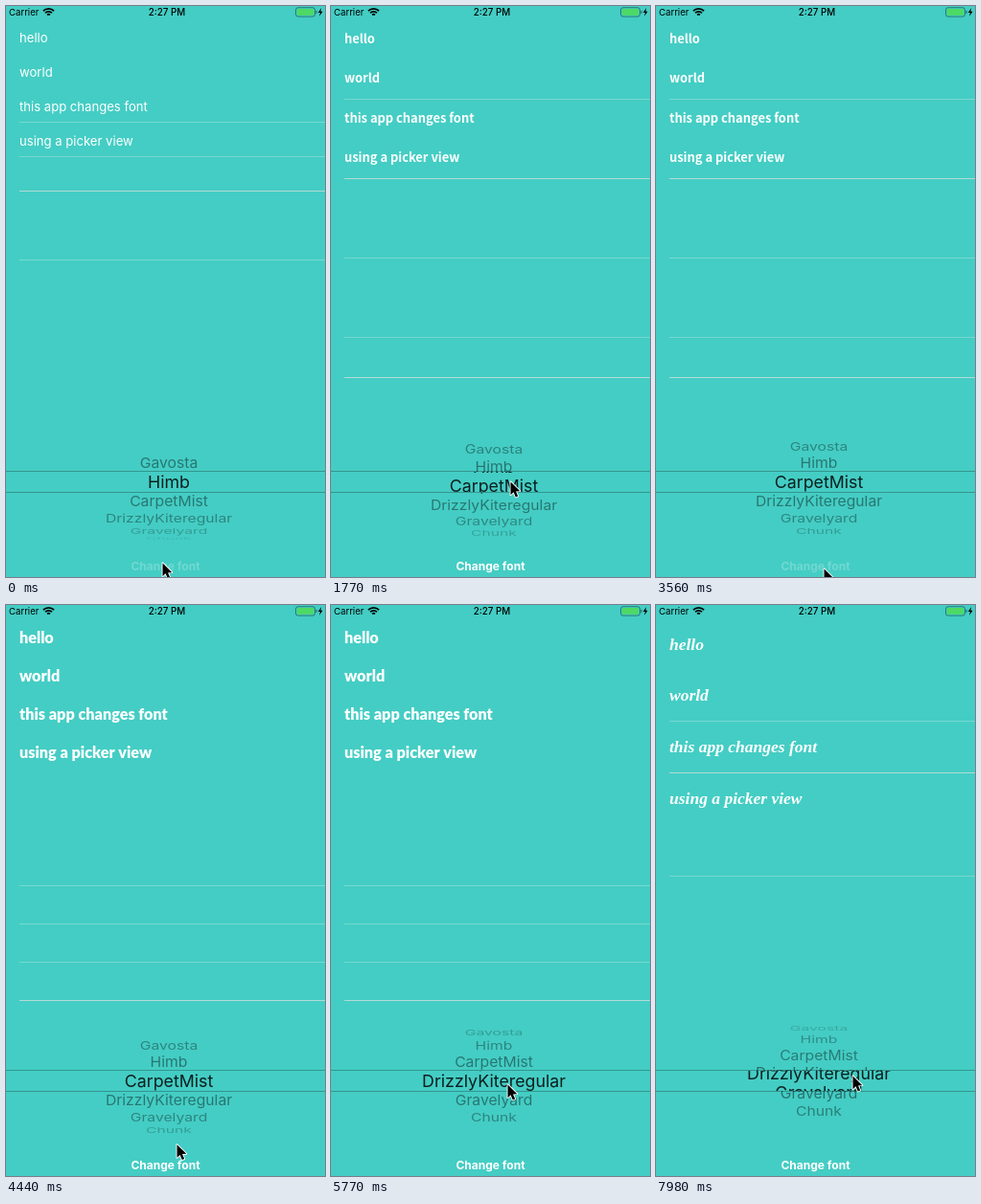
These frames come from a looping animation (333 by 597 pixels, 8 s). An HTML page with a canvas:

```html
<!DOCTYPE html>
<html lang="en">
<head>
<meta charset="utf-8">
<title>Font picker</title>
<style>
  html, body { margin: 0; width: 100%; height: 100%; overflow: hidden; background: #44cdc4; }
  canvas { display: block; width: 333px; height: 597px; }
</style>
</head>
<body>
<canvas id="stage"></canvas>
<script>
const WIDTH = 333, HEIGHT = 597, LOOP = 8000, STEP = 147.8;
const UI = 'Inter, sans-serif';
const canvas = document.getElementById('stage');
const ctx = canvas.getContext('2d');
const ratio = window.devicePixelRatio || 1;
canvas.width = WIDTH * ratio;
canvas.height = HEIGHT * ratio;

const rows = ['hello', 'world', 'this app changes font', 'using a picker view'];
const fontNames = ['Gavosta', 'Himb', 'CarpetMist', 'DrizzlyKiteregular', 'Gravelyard', 'Chunk'];

// Dividers lie on row edges; only some of them show, and a few are bright.
const listTop = 13.8;
const listStyles = [
  { font: `13.1px ${UI}`, pitch: 36, drop: 5.7, dividers: [3, 4, 7], bright: [5] },
  { font: 'bold 12.9px "Noto Sans CJK JP", "Noto Sans CJK", sans-serif', pitch: 41.6, drop: 3.9, dividers: [2, 6, 8], bright: [4, 9] },
  { font: '900 16.2px Lato, sans-serif', pitch: 40, drop: 6.2, dividers: [7, 8, 9], bright: [10] },
  { font: 'italic bold 17.5px "Liberation Serif", serif', pitch: 53.9, drop: 5.8, dividers: [2, 5], bright: [3] }
];

// Steps at which the button is tapped and the wheel is dragged.
const taps = [0, 24, 46];
const drags = [8, 32];
const lastDrag = 53;

const cursorStart = { x: 163, y: 582 };
const cursorMoves = [
  { from: 2, to: 6, x: 185, y: 515 },
  { from: 8, to: 11, x: 187, y: 497 },
  { from: 13, to: 18, x: 175, y: 588 },
  { from: 29, to: 32, x: 184, y: 515 },
  { from: 32, to: 35, x: 184, y: 501 },
  { from: 39, to: 41, x: 176, y: 600 },
  { from: 42, to: 44, x: 171, y: 583 },
  { from: 48, to: 52, x: 205, y: 508 },
  { from: 53, to: 54, x: 205, y: 492 }
];

const progress = (step, from, to) => Math.min(1, Math.max(0, (step - from) / (to - from)));
const smooth = p => p * p * (3 - 2 * p);

function cursorAt(step) {
  return cursorMoves.reduce((at, move) => {
    const p = progress(step, move.from, move.to);
    return { x: at.x + (move.x - at.x) * p, y: at.y + (move.y - at.y) * p };
  }, cursorStart);
}

function wheelPosition(step) {
  const turned = drags.reduce((sum, start) => sum + smooth(progress(step, start, start + 5.5)), 1);
  return turned + .4 * progress(step, lastDrag, lastDrag + 1);
}

function buttonOpacity(step) {
  const lastTap = taps.findLast(tap => tap <= step);
  return .24 + .76 * progress(step, lastTap, lastTap + 3) ** 2;
}

function text(string, x, y, font, color, align = 'left') {
  ctx.font = font;
  ctx.fillStyle = color;
  ctx.textAlign = align;
  ctx.fillText(string, x, y);
}

function polygon(points) {
  ctx.beginPath();
  points.forEach(([x, y]) => ctx.lineTo(x, y));
  ctx.closePath();
}

function drawStatusBar() {
  text('Carrier', 3, 10, `9.6px ${UI}`, '#000');
  text('2:27 PM', 168, 10, `500 9.8px ${UI}`, '#000', 'center');

  ctx.strokeStyle = ctx.fillStyle = '#000';
  ctx.lineWidth = 1.7;
  for (const radius of [2, 5, 7.9]) {
    ctx.beginPath();
    ctx.arc(44.5, 10.8, radius, -Math.PI * .75, -Math.PI * .25);
    ctx.stroke();
  }

  ctx.strokeStyle = ctx.fillStyle = 'rgba(0,0,0,.45)';
  ctx.lineWidth = .9;
  ctx.beginPath();
  ctx.roundRect(302.5, 1.7, 20, 9.4, 2.4);
  ctx.stroke();
  ctx.fillRect(323.4, 4.9, 1.2, 3);
  ctx.fillStyle = '#4cd964';
  ctx.beginPath();
  ctx.roundRect(303.8, 3, 17.4, 6.8, 1.2);
  ctx.fill();
  ctx.fillStyle = '#000';
  polygon([[329.2, 2], [325.8, 7], [328, 7], [327, 10.8], [330.6, 5.8], [328.4, 5.8]]);
  ctx.fill();
}

function drawDividers(edges, pitch, color) {
  ctx.fillStyle = color;
  for (const edge of edges) ctx.fillRect(14, Math.floor(listTop + edge * pitch), WIDTH - 14, 1);
}

function drawList(step) {
  const applied = taps.filter(tap => tap < step).length;
  const { font, pitch, drop, dividers, bright } = listStyles[applied];
  drawDividers(dividers, pitch, 'rgba(235,240,236,.3)');
  drawDividers(bright, pitch, 'rgba(238,228,224,.65)');
  rows.forEach((row, i) => text(row, 14, listTop + (i + .5) * pitch + drop, font, '#fff'));
}

// The wheel is drawn twice: dim items outside the selection band, larger dark ones inside it.
function drawWheel(position, size, isSelected) {
  const radius = 60, pitch = .34;
  ctx.save();
  ctx.beginPath();
  if (isSelected) ctx.rect(0, 487, WIDTH, 21);
  else {
    ctx.rect(0, 430, WIDTH, 57);
    ctx.rect(0, 508, WIDTH, 62);
  }
  ctx.clip();
  fontNames.forEach((name, i) => {
    const angle = (i - position) * pitch;
    const depth = Math.cos(angle);
    if (depth < .05) return;
    ctx.save();
    ctx.translate(170, 498 + radius * Math.sin(angle));
    ctx.scale(1, depth);
    const color = isSelected ? '#0b1f1e' : `rgba(0,0,0,${.45 * depth})`;
    text(name, 0, size * .36, `${size}px ${UI}`, color, 'center');
    ctx.restore();
  });
  ctx.restore();
}

function drawPicker(position) {
  drawWheel(position, 15.7, false);
  drawWheel(position, 17.8, true);
  ctx.fillStyle = 'rgba(0,0,0,.27)';
  ctx.fillRect(0, 486, WIDTH, 1);
  ctx.fillRect(0, 508, WIDTH, 1);
}

function drawCursor({ x, y }) {
  ctx.save();
  ctx.translate(x, y);
  polygon([[.5, .5], [.5, 14.2], [3.6, 11.3], [5.8, 16.4], [8.2, 15.4], [6, 10.4], [10.3, 10.2]]);
  ctx.lineJoin = 'round';
  ctx.lineWidth = 1.8;
  ctx.strokeStyle = '#fff';
  ctx.stroke();
  ctx.fillStyle = '#000';
  ctx.fill();
  ctx.restore();
}

function draw(now) {
  // The screen updates in even steps, so motion is sampled on them.
  const step = Math.floor((now % LOOP + 6) / STEP);
  ctx.setTransform(ratio, 0, 0, ratio, 0, 0);
  ctx.fillStyle = '#44cdc4';
  ctx.fillRect(0, 0, WIDTH, HEIGHT);
  drawStatusBar();
  drawList(step);
  drawPicker(wheelPosition(step));
  text('Change font', 166.5, 590.3, `bold 12px ${UI}`, `rgba(255,255,255,${buttonOpacity(step)})`, 'center');
  drawCursor(cursorAt(step));
  requestAnimationFrame(draw);
}
requestAnimationFrame(draw);
</script>
</body>
</html>
```
